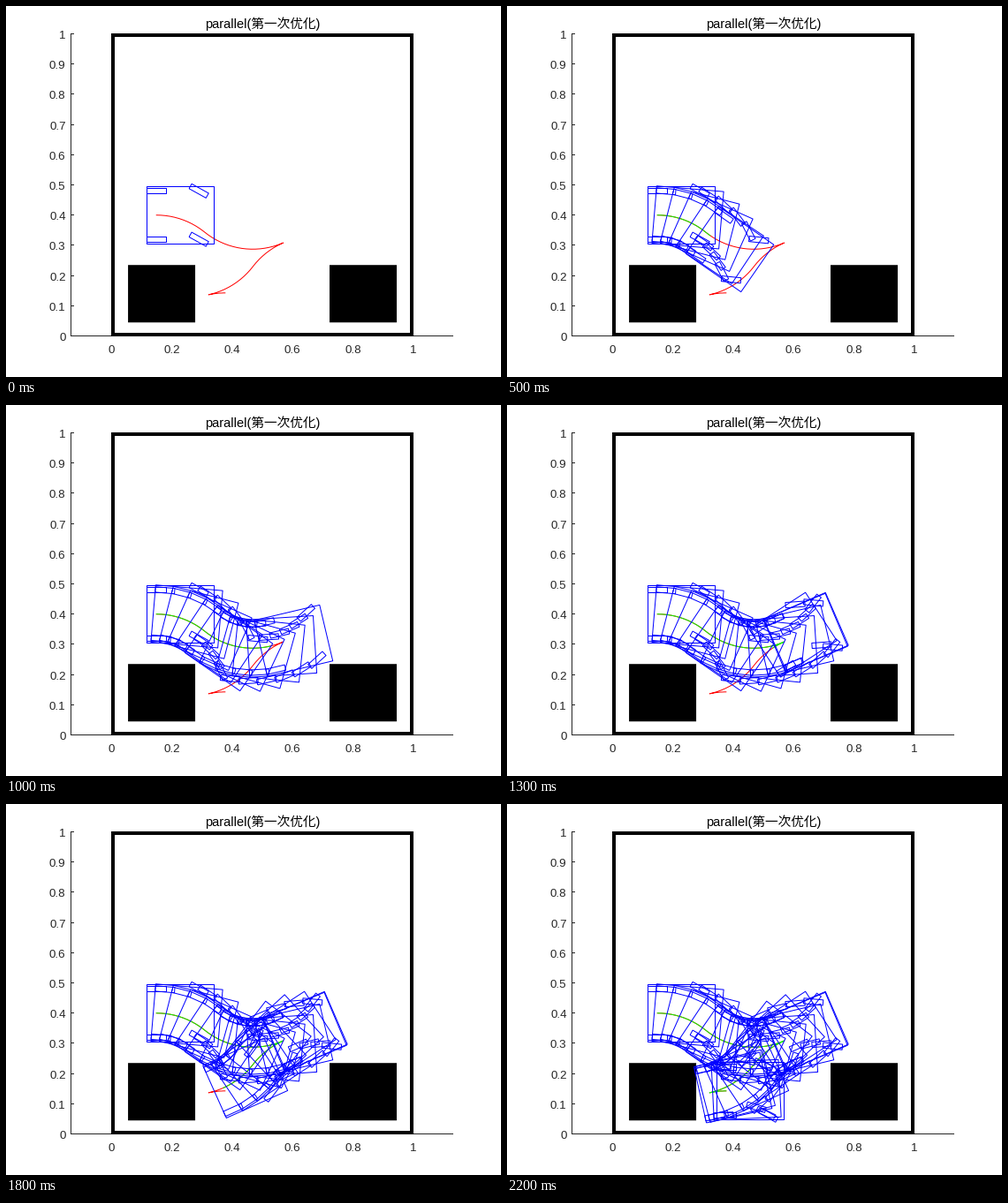
A matplotlib script for the animation above (3.3 s loop, 560x420 px).

```python
import numpy as np
import matplotlib
import matplotlib.pyplot as plt
from matplotlib.animation import FuncAnimation
from matplotlib.collections import LineCollection
from matplotlib.patches import Rectangle

W, H, DPI = 560, 420, 100
STEP_MS, FRAMES = 100, 33
PX = 72 / DPI                       # one pixel in points
SCALE, X0, Y0 = 342.3, 118.9, 373.65

# car geometry in plot units
RADIUS, BASE = 0.2527, 0.14
REAR, FRONT, HALF = 0.032, 0.190, 0.095
TRACK, WHEEL_L, WHEEL_W = 0.08, 0.032, 0.009
STEER = np.arctan(BASE / RADIUS)
START = (0.15, 0.40)

# headings where the curve bends the other way or the car changes gear
A, G, M, E = np.radians([39.0, 23.5, 52.6, 12.4])

# (gear, turn, swept angle)
ARCS = [(1, -1, A), (1, 1, A + G), (-1, -1, M - G), (-1, 1, M - E), (1, -1, E)]
CUSP = 2 * A + G
BACK = CUSP + 2 * M - G - E
END = BACK + E

# swept angle at each drawn car
STEP, FIRST = np.radians([9.6, 4.85])
STOPS = np.concatenate([
    [0],
    FIRST + STEP * np.arange(11),
    CUSP + STEP * np.arange(8),
    [BACK, BACK + STEP, END],
])


def pose(s):
    """Rear axle position, heading and steering after sweeping angle s."""
    x, y = START
    h = 0.0
    for i, (gear, turn, size) in enumerate(ARCS):
        last = i == len(ARCS) - 1 or s < size - 1e-9
        h2 = h + turn * gear * (min(s, size) if last else size)
        x += turn * RADIUS * (np.sin(h2) - np.sin(h))
        y -= turn * RADIUS * (np.cos(h2) - np.cos(h))
        h = h2
        if last:
            return x, y, h, turn * STEER
        s -= size


def to_px(pts):
    pts = np.asarray(pts, float)
    return np.column_stack([X0 + SCALE * pts[:, 0], Y0 - SCALE * pts[:, 1]])


def place(pts, x, y, h):
    c, s = np.cos(h), np.sin(h)
    return np.asarray(pts) @ np.array([[c, s], [-s, c]]) + [x, y]


def box(x1, x2, half):
    return [(x1, -half), (x2, -half), (x2, half), (x1, half), (x1, -half)]


def car(s):
    """Outlines of the body and the four wheels."""
    x, y, h, steer = pose(s)
    parts = [box(-REAR, FRONT, HALF)]
    for along, turn in ((0, 0), (BASE, steer)):
        for side in (-TRACK, TRACK):
            parts.append(place(box(-WHEEL_L, WHEEL_L, WHEEL_W), along, side, turn))
    return [to_px(place(p, x, y, h)) for p in parts]


def track(s):
    knots = np.linspace(0, s, int(s / 0.02) + 2)
    knots = np.append(knots, [k for k in (CUSP, BACK) if k < s])
    return to_px([pose(k)[:2] for k in np.sort(knots)])


matplotlib.rcParams["font.family"] = ["Liberation Sans", "Noto Sans CJK JP"]
fig = plt.figure(figsize=(W / DPI, H / DPI), dpi=DPI, facecolor="white")
ax = fig.add_axes([0, 0, 1, 1])
ax.set_xlim(0, W)
ax.set_ylim(H, 0)
ax.axis("off")

INK = (0.15, 0.15, 0.15)


def fill(x1, y1, x2, y2, color="black"):
    ax.add_patch(Rectangle((x1, y1), x2 - x1, y2 - y1, fc=color, lw=0,
                           snap=False))


def label(x, y, text, size, ha, color=INK):
    ax.text(x, y, text, fontsize=size * PX, ha=ha, va="baseline", color=color)


# axes, ticks and labels
fill(73, 373, 506, 374, INK)
fill(73, 31, 74, 374, INK)
for i in range(11):
    y = round(Y0 - SCALE * i / 10 - 0.5)
    fill(73, y, 77, y + 1, INK)
    label(67.5, y + 6, f"{i / 10:g}", 13.33, "right")
for i in range(6):
    label(X0 + SCALE * i / 5, 393, f"{i / 5:g}", 13.33, "center")
label(290, 25, "parallel(第一次优化)", 14.67, "center", "black")

# frame and parked cars
for bar in ((119, 31, 461, 35), (119, 370, 461, 374),
            (119, 31, 123, 374), (457, 31, 461, 374)):
    fill(*bar)
for left in (0.056, 0.722):
    (x1, y1), (x2, y2) = to_px([(left, 0.235), (left + 0.222, 0.045)])
    fill(x1, y1, x2, y2)

CARS = [car(s) for s in STOPS]
TRACKS = [track(s) for s in STOPS]

ax.plot(*track(END).T, color=(1, 0, 0), lw=PX)
done, = ax.plot([], [], color=(0, 1, 0), lw=PX)
cars = LineCollection([], colors=[(0, 0, 1)], linewidths=PX, zorder=3)
ax.add_collection(cars, autolim=False)


def update(i):
    k = min(i, len(STOPS) - 1)
    done.set_data(*TRACKS[k].T)
    cars.set_segments([part for c in CARS[:k + 1] for part in c])
    return done, cars


anim = FuncAnimation(fig, update, frames=FRAMES, interval=STEP_MS,
                     init_func=lambda: update(0), repeat=True, repeat_delay=0)
plt.show()
```
